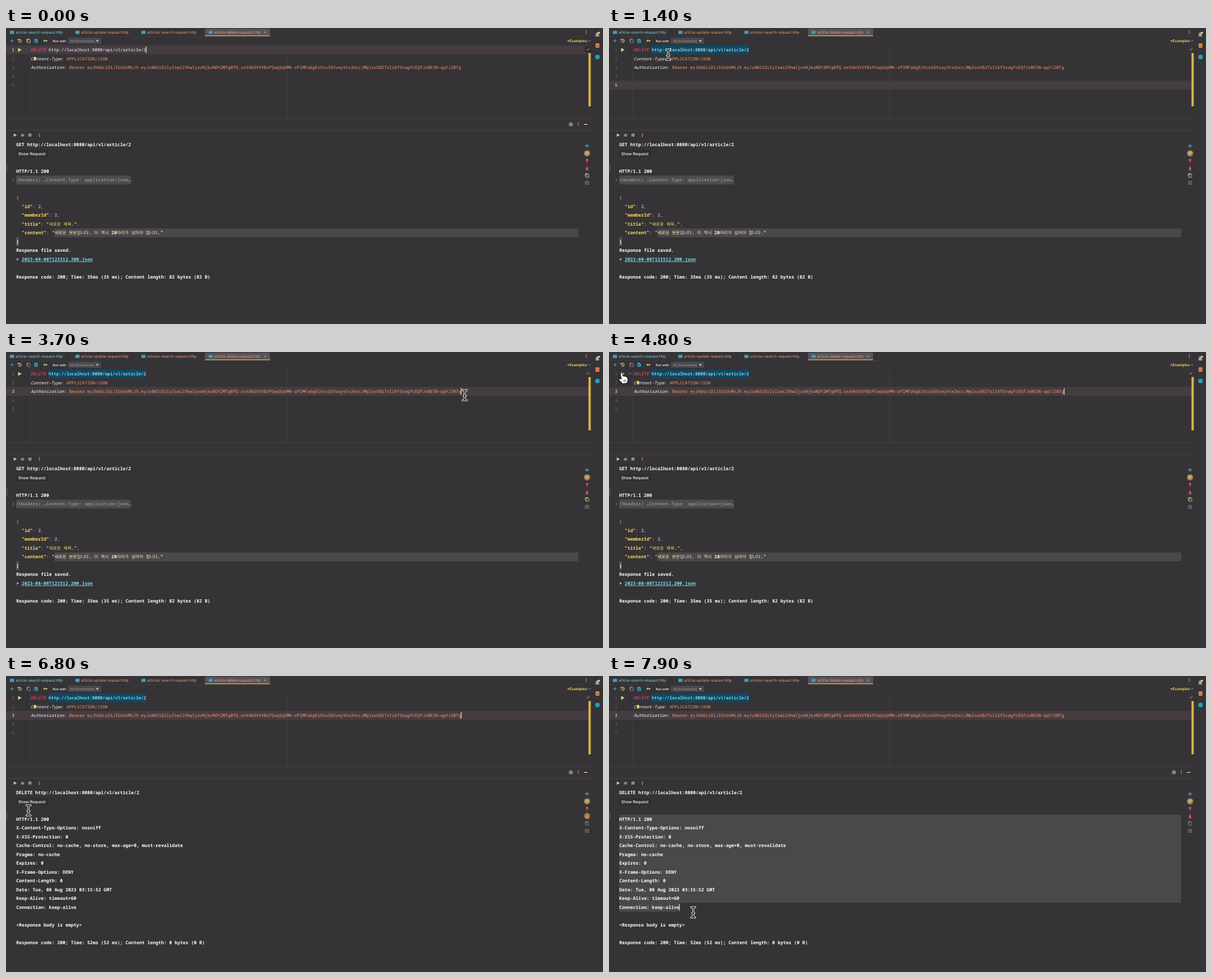
An HTML page with a canvas that plays this animation: 1049x521 px, repeating every 8 s.

```html
<!DOCTYPE html>
<html lang="ko">
<head>
<meta charset="utf-8">
<title>HTTP client</title>
<style>
html, body { margin: 0; width: 100%; height: 100%; overflow: hidden; background: #353336; }
canvas { display: block; }
</style>
</head>
<body>
<canvas id="stage" width="1049" height="521"></canvas>
<script>
const ctx = document.getElementById('stage').getContext('2d');
const LOOP = 8000, STEP = 100, ROW = 15.5, EDIT_X = 43.5, EDIT_W = 4.5, OUT_X = 18, OUT_W = 4.8;
const C = {
  bg: '#353336', line: '#48464a', caretRow: '#453d42', sel: '#4a484b', white: '#fcfcfa', grey: '#8b898c',
  dim: '#69676b', pink: '#ff4f7b', orange: '#fc9867', yellow: '#ffd866', green: '#b5e07c',
  cyan: '#78dce8', blue: '#45b4d6', purple: '#ab9df2', url: '#0b4a67'
};
const EDIT_FONT = '500 7.5px "Noto Sans Mono", monospace';
const OUT_FONT = '600 8px "Noto Sans Mono", monospace';
const HANGUL_FONT = '500 7.5px "Noto Sans CJK KR", "Noto Sans CJK", sans-serif';
const ui = (size, weight = 400) => `${weight} ${size}px Inter, sans-serif`;

const TOKEN = 'eyJhbGciOiJIUzUxMiJ9.eyJzdWIiOiIyIiwiZXhwIjoxNjkxNDY2MTg0fQ.' +
  'oxX4kOtVVBzPSaq5qVMh-rPlMFa6gEiXcol6XvayVtx2nccJMplsoXB27sIi6f3vagfcEQfJxBESN-qqYJZ0Tg';
const AUTH = 'Bearer ' + TOKEN, AUTH_COL = 15, AUTH_END = AUTH_COL + AUTH.length;
const URL_TEXT = 'http://localhost:8080/api/v1/article/2';

const pair = (key, value, color, end) =>
  [[`  "${key}"`, C.yellow], [': ', C.grey], [value, color], [end, C.grey]];
const GET_OUTPUT = {
  0: 'GET ' + URL_TEXT,
  3: 'HTTP/1.1 200',
  4: [['(Headers) …Content-Type: application/json…', C.grey]],
  6: [['{', C.grey]],
  7: pair('id', '2', C.purple, ','),
  8: pair('memberId', '2', C.purple, ','),
  9: pair('title', '"새로운 제목."', C.yellow, ','),
  10: [['  "content"', C.yellow], [': ', C.grey], ['"', C.yellow],
    ['새로운 본문입니다. 이 역시 20자리가 넘어야 합니다."', '#fff0bd']],
  11: '}',
  12: 'Response file saved.',
  13: [['> ', C.white], ['2023-08-08T121512.200.json', C.cyan]],
  15: 'Response code: 200; Time: 35ms (35 ms); Content length: 82 bytes (82 B)'
};
const DELETE_OUTPUT = {
  0: 'DELETE ' + URL_TEXT,
  3: 'HTTP/1.1 200',
  4: 'X-Content-Type-Options: nosniff',
  5: 'X-XSS-Protection: 0',
  6: 'Cache-Control: no-cache, no-store, max-age=0, must-revalidate',
  7: 'Pragma: no-cache',
  8: 'Expires: 0',
  9: 'X-Frame-Options: DENY',
  10: 'Content-Length: 0',
  11: 'Date: Tue, 08 Aug 2023 03:15:52 GMT',
  12: 'Keep-Alive: timeout=60',
  13: 'Connection: keep-alive',
  15: '<Response body is empty>',
  17: 'Response code: 200; Time: 52ms (52 ms); Content length: 0 bytes (0 B)'
};

// Pointer stops: time, x, y
const PATH = [
  [100, 270, 62], [800, 150, 102], [1400, 104, 47], [2000, 111, 75], [2200, 117, 76],
  [2700, 698, 76], [3200, 806, 76], [3700, 806, 76], [4600, 25, 46], [5500, 25, 46],
  [5800, 53, 148], [6300, 60, 215], [7300, 19, 258], [7500, 41, 283], [7900, 148, 416]
];

function pointer(t) {
  const i = Math.max(1, PATH.findIndex(p => p[0] >= t));
  const [a, b] = [PATH[i - 1], PATH[i]];
  const k = (t - a[0]) / (b[0] - a[0]);
  return [a[1] + (b[1] - a[1]) * k, a[2] + (b[2] - a[2]) * k];
}

function box(x, y, w, h, color) {
  ctx.fillStyle = color;
  ctx.fillRect(x, y, w, h);
}

function round(x, y, w, h, r, color) {
  ctx.fillStyle = color;
  ctx.beginPath();
  ctx.roundRect(x, y, w, h, r);
  ctx.fill();
}

function disc(x, y, r, color) {
  ctx.fillStyle = color;
  ctx.beginPath();
  ctx.arc(x, y, r, 0, 7);
  ctx.fill();
}

// SVG path around a local origin
function shape(x, y, d, color, width = 0, fill = false) {
  const p = new Path2D(d);
  ctx.save();
  ctx.translate(x, y);
  ctx.lineCap = ctx.lineJoin = 'round';
  ctx.fillStyle = ctx.strokeStyle = color;
  ctx.lineWidth = width;
  if (width) ctx.stroke(p);
  if (fill || !width) ctx.fill(p);
  ctx.restore();
}

function text(s, x, y, color, font) {
  ctx.font = font;
  ctx.fillStyle = color;
  ctx.fillText(s, x, y);
  return x + ctx.measureText(s).width;
}

function output(runs, row) {
  let x = OUT_X;
  if (typeof runs === 'string') runs = [[runs, C.white]];
  for (const [s, color] of runs)
    for (const part of s.split(/([가-힣]+)/))
      x = text(part, x, rowY(row) + 2.9, color, /[가-힣]/.test(part) ? HANGUL_FONT : OUT_FONT);
}

const rowY = row => 205.5 + ROW * row;
const editY = line => 38.3 + ROW * (line - 1);
const code = (s, col, line, color, style = '') =>
  text(s, EDIT_X + col * EDIT_W, editY(line) + 2.7, color, style + EDIT_FONT);
const dots = (x, y) => [-2.3, 0, 2.3].forEach(d => disc(x, y + d, 0.75, C.yellow));
const play = (x, y, s, color) => shape(x, y, `M${-s * .8} ${-s}L${s} 0L${-s * .8} ${s}Z`, color);
const copyIcon = (x, y, color) => shape(x, y, 'M-3 1.5V-3.3H1.5M-1.5-1.8H3V3.3H-1.5Z', color, 0.9);

function tabs() {
  box(350, 1, 114, 13, '#575356');
  box(350, 13, 114, 1.6, '#d9ad45');
  box(0, 14.6, 1028, 0.6, '#434144');
  [115, 231, 349].forEach(x => box(x, 1, 0.7, 13, '#454346'));
  [['article-search', 17], ['article-update', 132], ['articles-search', 248], ['article-delete', 366]]
    .forEach(([name, x], i) => {
      round(x - 10.5, 4.5, 8, 6.5, 1, '#2a7d96');
      shape(x - 6.5, 7.8, 'M-2.2 1.3V-1.3M-.3 1.3V-1.3H1M2.2 1.3V-1.3', '#bfeaf2', 0.6);
      text(name + '-request.http', x, 10, i ? C.orange : C.cyan, ui(6.5));
    });
  shape(455.5, 7.7, 'M-1.6-1.6L1.6 1.6M1.6-1.6L-1.6 1.6', '#bbb', 0.7);
  dots(1019.5, 7.5);
}

function toolbar(copyOn) {
  shape(10.5, 22.5, 'M-2.7 0H2.7M0-2.7V2.7', C.blue, 0.9);
  shape(24, 22.5, 'M-2.6-1.5A3 3 0 1 1-2.6 1.5M-3.2-3V-1.2H-1.4M0-1.6V.3L1.4 1', '#ffd9a0', 0.9);
  copyIcon(39.5, 22.5, copyOn ? C.green : C.grey);
  shape(53, 22.5, 'M-2.4-3.2H1L2.6-1.6V3.2H-2.4Z', '#3a9fc4', 0.8, true);
  shape(53, 23, 'M0-1.4V1.5M-1.3.3L0 1.5L1.3.3', C.bg, 0.7);
  play(67.8, 22.5, 2, C.green);
  play(71.3, 22.5, 2, C.green);
  text('Run with:', 82.3, 24.6, C.white, ui(5.5, 500));
  round(109, 17.2, 58, 10.6, 1.5, '#4b494c');
  text('No Environment', 113, 24.6, '#a3a1a4', ui(5.5));
  shape(160.5, 22.7, 'M-2.4-1.3H2.4L0 1.8Z', '#ddd');
  text('*Examples', 986, 25, C.yellow, ui(6.5, 600));
  shape(1024.7, 22.5, 'M-1.7-.8L0 .9L1.7-.8', C.cyan, 0.8);
}

function sidebar() {
  shape(1039, 11.5, 'M-3.5 2.5L-2.3 1V-1.2A2.3 2.3 0 0 1 2.3-1.2V1L3.5 2.5ZM-1 3.6H1', '#aaa8ab', 0.6, true);
  disc(1042, 8.2, 1.7, C.yellow);
  shape(1039.3, 31, 'M-3.5-2.6A3.5 1.4 0 0 1 3.5-2.6V2.6A3.5 1.4 0 0 1-3.5 2.6Z', '#f0924f');
  shape(1039.3, 31, 'M-3.5-1.2Q0 .6 3.5-1.2M-3.5 1Q0 2.8 3.5 1', C.bg, 0.6);
  disc(1039.3, 51, 4, '#1fa5b5');
}

function editor(t, x) {
  const line = t < 800 ? 1 : t < 2200 ? 5 : 3;
  const dragging = t >= 2200 && t < 3400;
  const end = Math.min(AUTH_END, Math.max(AUTH_COL, Math.round((x - 6 - EDIT_X) / EDIT_W)));
  const bulb = t < 800 || t >= 4600 && t < 5300 || t >= 6500;

  box(0, editY(line) - 7.8, 1024, ROW, C.caretRow);
  box(42, 31, 0.8, 128, '#454346');
  box(493, 31, 0.8, 128, '#464447');
  for (let n = 1; n <= 5; n++) text(n, 10.3, editY(n) + 2.7, n === line ? C.white : C.dim, EDIT_FONT);
  if (t >= 800) box(EDIT_X + 7 * EDIT_W, editY(1) - 7.2, URL_TEXT.length * EDIT_W, ROW - .5, C.url);
  play(24, 38.4, 3.5, C.green);
  if (t >= 4400 && t < 6100) shape(37.3, 38.3, 'M-2.2-1.1L0 1.1L2.2-1.1', '#aaa', 0.8);

  code('DELETE', 0, 1, C.pink, 'italic ');
  code(URL_TEXT, 7, 1, C.white);
  code('Content-Type', 0, 2, C.white, 'italic ');
  code(':', 12, 2, C.white);
  code('APPLICATION/JSON', 14, 2, C.orange);
  code('Authorization', 0, 3, C.white, 'italic ');
  code(':', 13, 3, C.white);
  const split = dragging ? end - AUTH_COL : 0;
  code(AUTH.slice(0, split), AUTH_COL, 3, C.white);
  code(AUTH.slice(split), AUTH_COL + split, 3, C.orange);

  if (bulb) {
    disc(51, 53, 2.3, C.yellow);
    box(50, 55, 2, 2.2, C.yellow);
  }
  const since = t < 800 ? t : t < 2200 ? t - 900 : t - 3700;
  const lit = t < 7300 && (dragging || since < 0 || since % 1000 < 500);
  const col = line === 1 ? 45 : line === 5 ? 0 : dragging ? end : AUTH_END;
  if (lit) box(EDIT_X + col * EDIT_W - .2, editY(line) - 6, 1, 12, C.white);

  if (t < 300) round(1017, 32, 11, 11, 1.5, '#2c2a2d');
  shape(1022.4, 37.5, 'M-2.5 0L-.8 1.8L2.6-2', '#c9c45f', 0.9);
  round(1023.5, 44, 4, 94, 1, '#d9b54c');
}

function panelFrame(t, done, running, jump) {
  box(0, 159, 1028, 0.8, C.line);
  box(0, 179.7, 1028, 0.8, C.line);
  if (t < 800 || t >= 5900) {
    shape(992.5, 169.5, 'M3 0A3 3 0 1 1-3 0A3 3 0 1 1 3 0M1.2 0A1.2 1.2 0 1 1-1.2 0A1.2 1.2 0 1 1 1.2 0', '#dddbde', 0.9);
    dots(1005.5, 169.5);
    box(1015.7, 169, 5.6, 1.1, C.white);
  }
  play(16, 188.5, 3, running ? '#d5e08a' : C.green);
  disc(29, 188.7, 2.5, C.grey);
  shape(29, 188.7, 'M-3-2L3 2M3-2L-3 2M-3 0H3', C.grey, 0.6);
  box(39.3, 185.7, 5.5, 5.5, running ? C.pink : C.grey);
  dots(58.5, 188.5);
  round(0, running ? 226 : 240, 3, 13, 1, '#48464a');

  shape(1021, 207.5, 'M-3.6 0Q0-4 3.6 0Q0 4-3.6 0Z', C.blue, 0.8);
  disc(1021, 207.5, 1.2, C.blue);
  disc(1021, 220.5, 5.5, '#96824f');
  shape(1021, 220.5, 'M-2.8-2H2.8M-2.8 0H2.8M-2.8 2H1', '#ffe4a0', 0.8);
  shape(1021, 233.7, 'M0 3V-2.8M-2-.8L0-2.9L2-.8', C.pink, 1.3);
  if (jump) disc(1021, 246.3, 5.5, '#a5733f');
  shape(1021, 246.3, 'M0-3V2.3M-2 .4L0 2.4L2 .4M-2 3.4H2', jump ? '#ffb45f' : C.pink, jump ? 0.8 : 1.2);
  copyIcon(1021, 259.5, done ? C.grey : C.green);
  shape(1021, 272.5, 'M-3-2.6H3M-3 2.6H3M-2.8-1.2H2.8V1.4H-2.8Z', C.grey, 0.8);
}

function results(t, done) {
  const lines = done ? DELETE_OUTPUT : GET_OUTPUT;
  let caret;
  if (!done) {
    box(OUT_X, rowY(4) - 7.7, 42 * OUT_W, ROW, '#4c4a4d');
    shape(13, rowY(4), 'M-1.2-2.3L1.2 0L-1.2 2.3', '#a5a3a6', 0.8);
    box(85, rowY(10) - 7.7, 920.5, ROW, C.sel);
    box(OUT_X, rowY(11) - 7.7, OUT_W, ROW, '#55535a');
    box(OUT_X + 2 * OUT_W, rowY(13) + 4.2, 26 * OUT_W, 0.8, C.cyan);
  } else if (t >= 7400) {
    const k = (t - 7500) / 400;
    const row = Math.max(3, Math.round(4 + 9 * k));
    const col = Math.max(1, Math.min(lines[row].length, Math.round(2 + 20 * k)));
    box(OUT_X, rowY(3) - 7.7, 987.5, (row - 3) * ROW, C.sel);
    box(OUT_X, rowY(row) - 7.7, col * OUT_W, ROW, C.sel);
    caret = [OUT_X + col * OUT_W - .4, rowY(row) - 6];
  }
  round(18, 215, 56, 12, 2, '#302e31');
  text('Show Request', 21.5, 223.5, C.white, ui(7, 500));
  for (const row in lines) output(lines[row], +row);
  if (caret) box(...caret, 1, 12, C.white);
}

function cursor(x, y) {
  if (x < 42 && y < 140) {
    const hand = 'M-4.6-8.2Q-3.3-10-2-8.2L-.3-2.6Q1-4.2 2.2-2.6Q3.6-3.6 4.6-1.8Q6.4-2.4 6.9-.4' +
      'Q8.6 4 6.4 8.2L-.6 9.4Q-3.6 6.4-6.6 3.4Q-7.4 1.2-5 1.3L-2.6 2.6Z';
    shape(x, y, hand, '#111', 2);
    shape(x, y, hand, C.white);
    shape(x, y, 'M1 3.4L1.7 6.8M3.2 2.9L3.9 6.2', '#222', 0.8);
    return;
  }
  const beam = 'M-3.5-9Q0-9 0-6.5Q0-9 3.5-9M0-6.5V6.5M-3.5 9Q0 9 0 6.5Q0 9 3.5 9M-1.8 1.5H1.8';
  shape(x, y, beam, C.white, 3.4);
  shape(x, y, beam, '#111', 1.4);
}

function draw(now) {
  const t = Math.floor(now % LOOP / STEP) * STEP;
  const [x, y] = pointer(t);
  const done = t >= 5600;
  ctx.textRendering = 'geometricPrecision';
  box(0, 0, 1049, 521, C.bg);
  tabs();
  toolbar(t < 800 || t >= 2200 && t < 3400);
  sidebar();
  editor(t, x);
  panelFrame(t, done, done && t < 6200, done && t < 7600);
  results(t, done);
  if (t >= 100) cursor(x, y);
}

let start;
function tick(now) {
  start ??= now;
  draw(now - start);
  requestAnimationFrame(tick);
}
draw(0);
requestAnimationFrame(tick);
</script>
</body>
</html>
```
